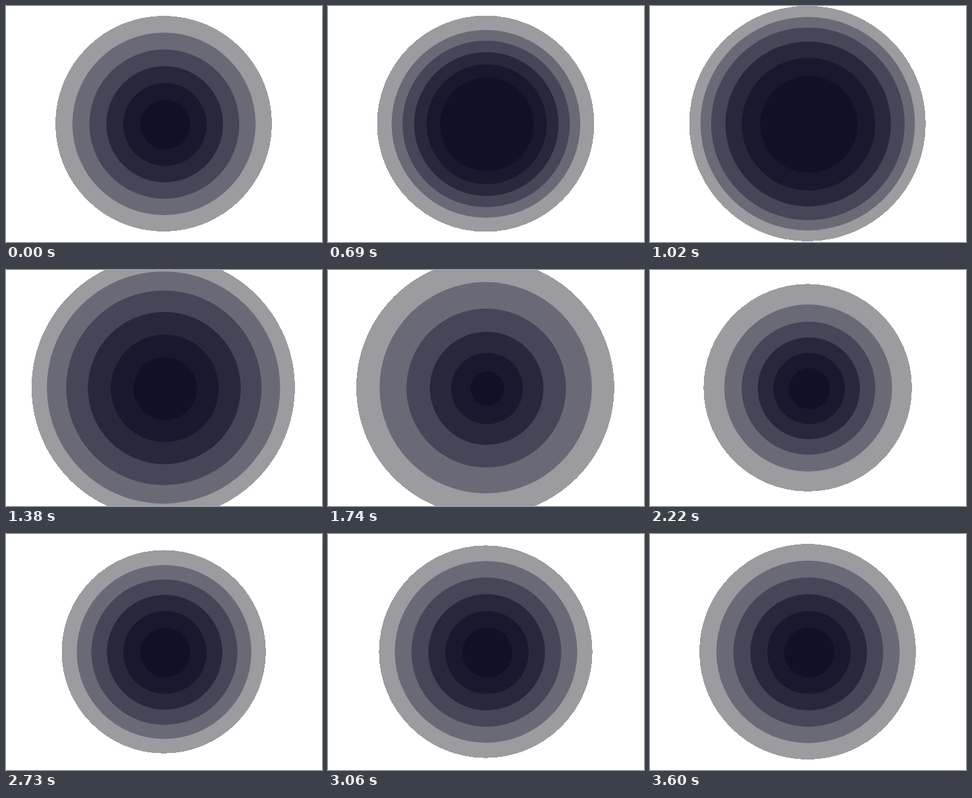
Recreate the animation shown at these times as an HTML page without scripts. Size 480 by 360 pixels, loop 3.63 s.

```html
<!DOCTYPE html>
<html lang="en">
<head>
<meta charset="utf-8">
<title>Pulsing rings</title>
<style>
  @property --swell {
    syntax: "<length>";
    inherits: false;
    initial-value: 0px;
  }

  html, body {
    margin: 0;
    width: 100%;
    height: 100%;
    overflow: hidden;
    background: #fff;
  }

  svg { display: block; width: 480px; height: 360px; }

  /* Larger rings lean slightly up and to the left. */
  circle {
    --radius: calc(38px + 25.3px * var(--ring) + var(--swell));
    r: var(--radius);
    cx: calc(242.75px - .0198 * var(--radius));
    cy: calc(181.45px - .0118 * var(--radius));
    animation: pulse 3630ms cubic-bezier(.364, 0, .636, 1) var(--delay) infinite;
  }

  @keyframes pulse {
    0%      { --swell: 0px; }
    24.793% { --swell: 38px; }
    49.587% { --swell: -12.7px; }
    73.829%, 100% { --swell: 0px; }
  }
</style>
</head>
<body>
<svg viewBox="0 0 480 360">
  <circle style="--ring: 5; --delay: 630ms" fill="#9b9ba0" shape-rendering="crispEdges"/>
  <circle style="--ring: 4; --delay: 500ms" fill="#6a6a77"/>
  <circle style="--ring: 3; --delay: 330ms" fill="#464659"/>
  <circle style="--ring: 2; --delay: 210ms" fill="#28283d"/>
  <circle style="--ring: 1; --delay: 100ms" fill="#18182e"/>
  <circle style="--ring: 0; --delay: 0ms" fill="#101026"/>
</svg>
</body>
</html>
```
